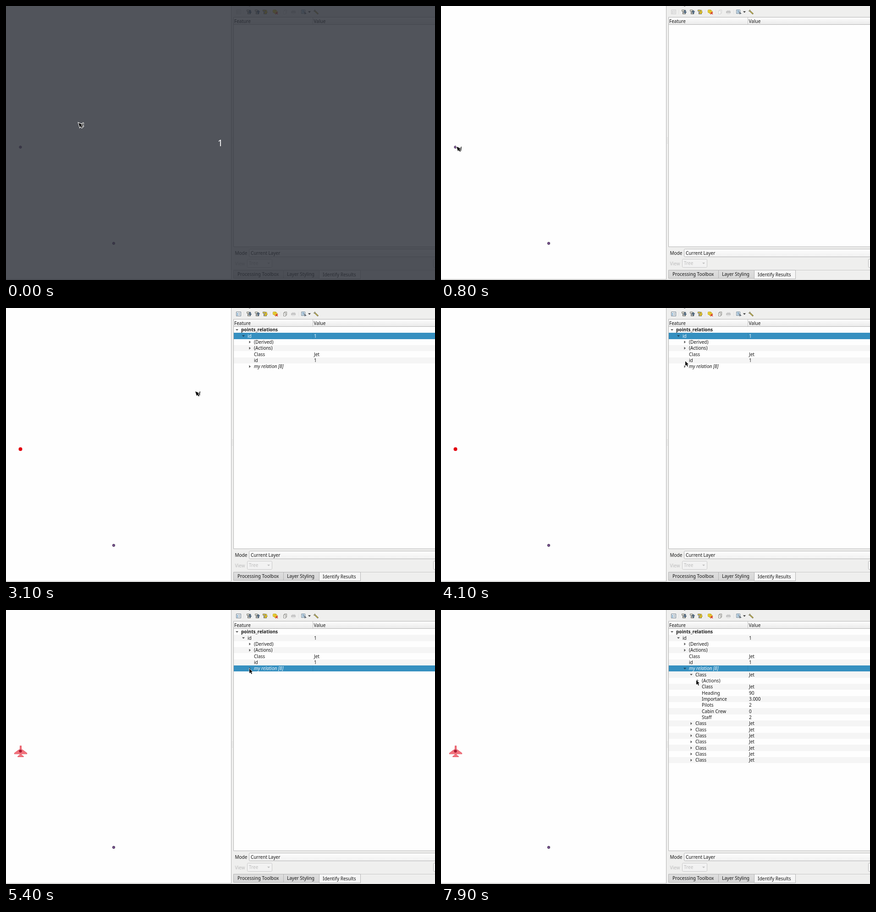
Recreate the animation shown at these times as an HTML page with a canvas. Size 936 by 598 pixels, loop 8 s.

```html
<!DOCTYPE html>
<html lang="en">
<head>
<meta charset="utf-8">
<title>Identify results</title>
<style>
html, body { margin: 0; width: 100%; height: 100%; overflow: hidden; background: #fefefe; }
canvas { display: block; }
</style>
</head>
<body>
<canvas id="stage" width="936" height="598"></canvas>
<script>
const ctx = document.getElementById('stage').getContext('2d');
const W = 936, H = 598, LOOP = 8000, STEP = 100;
const ROW_TOP = 41, ROW_H = 13.333;
const INK = '#161616', MUTED = '#bcbcbc', BLUE = '#3690c0', EDGE = '#b4b4b4';
const SANS = '"Noto Sans", "Open Sans", sans-serif';

// Moments at which the interface changes, in ms
const LIT = 100, IDENTIFIED = 1900, SELECTED = 4700, EXPANDED = 6300, OPENED = 7200;

// Pointer tip: time, x, y
const PATH = [
  [100, 158, 255], [400, 47, 311], [500, 47, 311], [800, 34, 307],
  [2300, 34, 307], [2400, 41, 307], [2500, 41, 307], [2900, 379, 212],
  [3000, 379, 212], [3400, 515, 92], [3600, 537, 66], [3700, 537, 66],
  [4100, 533, 116], [4300, 532, 130], [4400, 532, 130], [4600, 588, 128],
  [4800, 588, 128], [5200, 538, 128], [5400, 531, 128], [6600, 531, 128],
  [7000, 546, 141], [7600, 546, 141], [7900, 557, 153]
];

function pointerAt(t) {
  if (t <= PATH[0][0]) return PATH[0].slice(1);
  const next = PATH.findIndex(key => key[0] >= t);
  if (next < 0) return PATH[PATH.length - 1].slice(1);
  const [t0, x0, y0] = PATH[next - 1], [t1, x1, y1] = PATH[next];
  const u = (t - t0) / (t1 - t0);
  return [x0 + (x1 - x0) * u, y0 + (y1 - y0) * u];
}

function rect(x, y, w, h, fill) {
  ctx.fillStyle = fill;
  ctx.fillRect(x, y, w, h);
}

function box(x, y, w, h, fill, stroke, radius = 0) {
  ctx.beginPath();
  ctx.roundRect(x + .5, y + .5, w - 1, h - 1, radius);
  ctx.fillStyle = fill;
  ctx.fill();
  ctx.strokeStyle = stroke;
  ctx.lineWidth = 1;
  ctx.stroke();
}

function poly(points, fill, stroke, width = 1) {
  ctx.beginPath();
  points.forEach(([x, y]) => ctx.lineTo(x, y));
  ctx.closePath();
  if (stroke) {
    ctx.strokeStyle = stroke;
    ctx.lineWidth = width;
    ctx.stroke();
  }
  ctx.fillStyle = fill;
  ctx.fill();
}

function line(x0, y0, x1, y1, color, width = 1) {
  ctx.beginPath();
  ctx.moveTo(x0, y0);
  ctx.lineTo(x1, y1);
  ctx.strokeStyle = color;
  ctx.lineWidth = width;
  ctx.stroke();
}

function dot(x, y, r, fill, stroke) {
  ctx.beginPath();
  ctx.arc(x, y, r, 0, Math.PI * 2);
  ctx.fillStyle = fill;
  ctx.fill();
  if (!stroke) return;
  ctx.strokeStyle = stroke;
  ctx.lineWidth = 1;
  ctx.stroke();
}

function text(str, x, midY, color = INK, style = '', size = 10) {
  ctx.font = `${style} ${size}px ${SANS}`;
  ctx.fillStyle = color;
  ctx.fillText(str, x, midY + size * .36);
}

function shade(y, h, top, bottom) {
  const g = ctx.createLinearGradient(0, y, 0, y + h);
  g.addColorStop(0, top);
  g.addColorStop(1, bottom);
  return g;
}

function arrow(x, y, open, color = '#505050') {
  poly(open ? [[x - 3, y - 1.5], [x + 3, y - 1.5], [x, y + 1.8]]
            : [[x - 1.5, y - 3], [x + 1.8, y], [x - 1.5, y + 3]], color);
}

function plane(x, y) {
  const half = [[1.3, -12], [1.6, -4], [5, -2.5], [13.5, 4], [13.5, 5.5], [2, 5.5],
                [1.6, 8], [6, 10.8], [6, 12], [1, 12]];
  const outline = [...half, ...half.map(([dx, dy]) => [-dx, dy]).reverse()];
  poly(outline.map(([dx, dy]) => [x + dx, y + dy]), '#f3727c', '#d64756', 1.2);
}

function drawMap(t) {
  rect(0, 0, 491, 596, '#fefefe');
  if (t >= SELECTED) {
    plane(32, 308.5);
    dot(31.5, 308, 2.8, '#b5152f', '#8d2238');
  } else if (t >= IDENTIFIED) {
    dot(31.5, 308, 4, '#e3000f');
  } else {
    dot(31.5, 308, 2.7, '#7a5390', '#4b3858');
  }
  dot(235, 518, 2.7, '#7a5390', '#4b3858');
  rect(491, 0, 1, 597, EDGE);
  rect(0, 596, 492, 1, EDGE);
}

function treeIcon(x, up, yellow) {
  const tint = yellow ? '#f0d43a' : '#e8e8e4';
  box(x - 5, 8, 6, 4, tint, '#77776a');
  rect(x - 3, 12, 1, 6, '#777');
  box(x - 2, 13, 6, 5, tint, '#77776a');
  const s = up ? -1 : 1, c = 13;
  poly([[x + 1, c - 4 * s], [x + 4, c - 4 * s], [x + 4, c], [x + 6, c],
        [x + 2.5, c + 4 * s], [x - 1, c], [x + 1, c]], yellow ? '#d9b920' : '#536b82', '#4c5661', .6);
}

function drawToolbar(active) {
  const ink = active ? '#6c7c8b' : '#d0d0d0';
  rect(530, 0, 3, 1, '#777');

  box(502, 8, 11, 10, active ? '#f5f8fa' : '#eaeaea', ink);
  for (const y of [11, 14]) {
    rect(504, y, 2, 2, active ? '#4d8dbd' : '#d0d0d0');
    rect(507, y, 4, 1, ink);
  }
  treeIcon(530, false, false);
  treeIcon(548, true, false);
  treeIcon(565, false, true);

  box(582, 8, 8, 7, '#f4dc39', '#b99e20', 1);
  box(585, 10, 7, 7, '#f4dc39', '#b99e20', 1);
  line(588, 13, 593, 18, '#d22b27', 1.6);
  line(593, 13, 588, 18, '#d22b27', 1.6);

  const page = active ? '#8a8a86' : '#d3d3d3';
  box(607, 8, 6, 8, '#f6f6f5', page);
  box(605, 10, 6, 8, '#f6f6f5', page);
  if (active) rect(607, 13, 2, 1, page);

  rect(624, 9, 7, 3, '#dedede');
  box(622, 11, 10, 5, '#c9c9c9', '#bebebe', 1);
  rect(624, 15, 6, 3, '#e2e2e2');

  box(644, 8, 9, 9, '#dce7ef', '#738899');
  text('i', 647, 12, '#26659b', 'bold', 8);
  poly([[650, 11], [656, 17], [653, 17], [652, 19]], '#5b6670');
  arrow(662, 13, true, '#333');

  line(673, 10, 681, 17.5, '#5c5940', 3);
  line(674, 11, 680.5, 17, '#d8c64c', 1.5);
  dot(673, 10, 2.2, '#8e8a6b');
  rect(671, 8, 2, 2, '#efefee');

  for (const x of [518, 576, 599, 638]) rect(x, 8, 1, 10, '#e2e2e2');
}

function treeRows(t) {
  if (t < IDENTIFIED) return [];
  const row = (level, label, value = '', fold = '', style = '') => ({ level, label, value, fold, style });
  const rows = [
    row(0, 'points_relations', '', 'open', 'bold'),
    row(1, 'id', '1', 'open'),
    row(2, '(Derived)', '', 'shut'),
    row(2, '(Actions)', '', 'shut'),
    row(2, 'Class', 'Jet'),
    row(2, 'id', '1'),
    row(2, 'my relation [8]', '', t >= EXPANDED ? 'open' : 'shut', 'italic')
  ];
  if (t < EXPANDED) return rows;
  for (let i = 0; i < 8; i++) {
    const opened = i === 0 && t >= OPENED;
    rows.push(row(3, 'Class', 'Jet', opened ? 'open' : 'shut'));
    if (opened) rows.push(
      row(4, '(Actions)', '', 'shut'), row(4, 'Class', 'Jet'), row(4, 'Heading', '90'),
      row(4, 'Importance', '3.000'), row(4, 'Pilots', '2'), row(4, 'Cabin Crew', '0'), row(4, 'Staff', '2'));
  }
  return rows;
}

function drawTree(t) {
  box(496, 24, 445, 502, '#fefefe', EDGE);
  rect(497, 25, 439, 15, shade(25, 15, '#fcfcfc', '#ebebeb'));
  rect(497, 40, 439, 1, EDGE);
  rect(669, 25, 1, 15, '#c6c6c6');
  text('Feature', 498, 33);
  text('Value', 671.5, 33);

  const current = t >= SELECTED ? 6 : 1;
  treeRows(t).forEach((row, i) => {
    const y = Math.round(ROW_TOP + i * ROW_H), bottom = Math.round(ROW_TOP + (i + 1) * ROW_H);
    const mid = ROW_TOP + (i + .5) * ROW_H, selected = i === current;
    if (selected) {
      rect(497, y, 439, bottom - y, BLUE);
      rect(669, y, 1, bottom - y, '#3184b1');
    } else if (i % 2) {
      rect(497, y, 439, bottom - y, '#f5f5f5');
    }
    const x = 513 + row.level * 14, color = selected ? '#f4f9fc' : INK;
    if (row.fold) arrow(x - 9, mid, row.fold === 'open', selected ? '#1d3f54' : undefined);
    text(row.label, x, mid, color, row.style);
    text(row.value, 672, mid, color);
  });
}

function drawControls() {
  text('Mode', 499.5, 539);
  box(530, 530, 420, 18, shade(530, 18, '#fdfdfd', '#f1f1f1'), EDGE, 2);
  text('Current Layer', 534, 539);
  text('View', 499.5, 562, MUTED);
  box(526, 552, 55, 19, '#f2f2f2', '#c9c9c9', 2);
  text('Tree', 530, 561.5, MUTED);
  arrow(573, 561.5, true, '#c0c0c0');
  box(932, 552, 20, 19, '#f7f7f7', EDGE, 2);

  rect(773, 576, 163, 1, '#c8c8c8');
  box(496, 576, 110, 19, shade(576, 19, '#dedede', '#d6d6d6'), EDGE);
  box(605, 576, 79, 19, shade(576, 19, '#dedede', '#d6d6d6'), EDGE);
  box(683, 576, 91, 20, '#f6f6f6', EDGE);
  text('Processing Toolbox', 505, 585.5);
  text('Layer Styling', 613, 585.5);
  text('Identify Results', 691, 586);
  rect(492, 597, 444, 1, '#d9d9d9');
}

function drawPanel(t) {
  rect(492, 0, 444, H, '#efefee');
  for (let y = 287; y < 300; y += 3) rect(493, y, 2, 1, '#d5d5d5');
  drawToolbar(t >= IDENTIFIED);
  drawTree(t);
  drawControls();
}

function drawPointer(x, y) {
  x = Math.round(x);
  y = Math.round(y);
  const shift = points => points.map(([dx, dy]) => [x + dx, y + dy]);
  if (x < 491) {
    poly(shift([[0, 0], [9, 4], [6.5, 5.5], [9.5, 9], [7.5, 11], [4.5, 7.5], [3, 10]]), '#080808', '#fff', 2);
    ctx.font = `italic bold 11px "Noto Serif", serif`;
    ctx.lineWidth = 2;
    ctx.strokeStyle = '#fff';
    ctx.strokeText('i', x + 7.5, y + 7.5);
    ctx.fillStyle = '#080808';
    ctx.fillText('i', x + 7.5, y + 7.5);
  } else {
    poly(shift([[0, 0], [7, 7], [4, 7.2], [6, 11], [4.3, 11.8], [2.5, 8], [0, 10]]), '#080808', '#fff', 1.4);
  }
}

function draw(t) {
  rect(0, 0, W, H, '#efefee');
  drawMap(t);
  drawPanel(t);
  if (t < LIT) {
    rect(0, 0, W, H, 'rgba(46, 50, 58, .83)');
    ctx.textAlign = 'center';
    text('1', 467.5, 298.8, '#fff', '', 20);
    ctx.textAlign = 'left';
  }
  drawPointer(...pointerAt(t));
}

const start = performance.now();
function tick() {
  const t = (performance.now() - start) % LOOP;
  draw(Math.floor(t / STEP) * STEP);
  requestAnimationFrame(tick);
}
tick();
</script>
</body>
</html>
```
